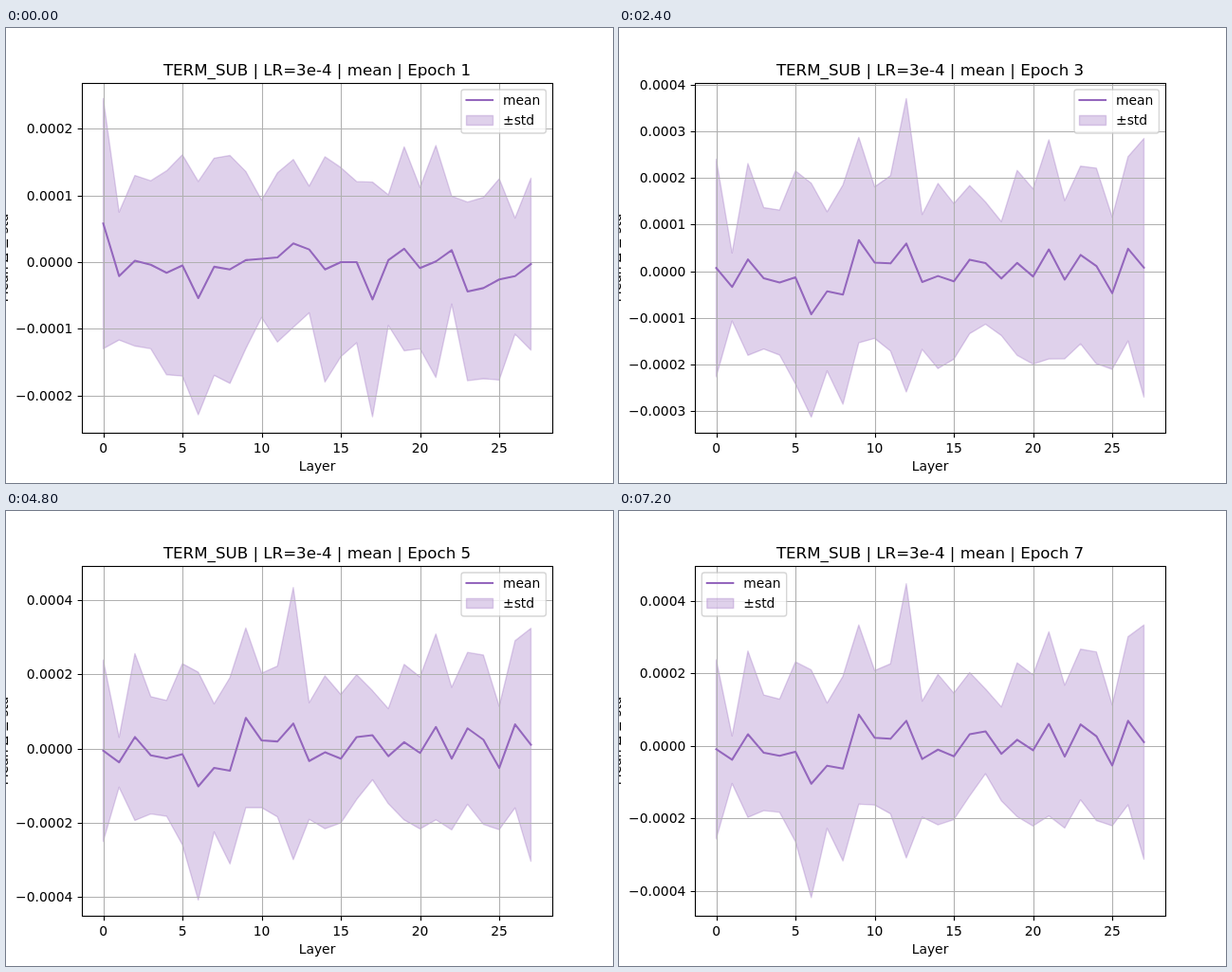
An HTML page for the animation above (8000 ms loop, 640 by 480 pixels).

```html
<!DOCTYPE html>
<html lang="en">
<head>
<meta charset="utf-8">
<title>Mean per layer</title>
<style>
  html, body { margin: 0; width: 100%; height: 100%; overflow: hidden; background: #fff; }
  svg { display: block; width: 640px; height: 480px; }
  text { font: 13.89px "DejaVu Sans", sans-serif; fill: #000; white-space: pre; }
  .title { font-size: 16.67px; }
  .mid { text-anchor: middle; }
  .end { text-anchor: end; }
  .grid { stroke: #b0b0b0; stroke-width: 1.11; fill: none; }
  .axis { stroke: #000; stroke-width: 1.11; fill: none; }
  .band { fill: #9467bd; fill-opacity: .3; stroke: #9467bd; stroke-opacity: .3; stroke-width: 1.39; stroke-linejoin: round; }
  .mean { fill: none; stroke: #9467bd; stroke-width: 2.08; stroke-linejoin: round; stroke-linecap: square; }
  .box { fill: #fff; stroke: #ccc; stroke-width: 1.39; opacity: .8; }
</style>
</head>
<body>
<svg viewBox="0 0 640 480">
  <path id="band" class="band"/>
  <path id="grid" class="grid"/>
  <path id="mean" class="mean"/>
  <path id="ticks" class="axis"/>
  <rect class="axis" x="80.5" y="58.5" width="496" height="369"/>
  <g id="xLabels"></g>
  <g id="yLabels"></g>
  <text class="mid" x="328" y="467">Layer</text>
  <text class="mid" transform="translate(1.5 242.4) rotate(-90)">Mean Δ ± std</text>
  <text id="title" class="title mid" x="328" y="49.5"></text>
  <g id="legend">
    <rect class="box" x="480" y="65" width="89.4" height="46" rx="2.8"/>
    <path class="mean" d="M485.5 76H513"/>
    <rect class="band" x="485.5" y="92.5" width="28" height="10"/>
    <text x="524" y="81">mean</text>
    <text x="524" y="102">±std</text>
  </g>
</svg>
<script>
const HOLD = 1200, LOOP = 8000;
const LEFT = 80, RIGHT = 576, TOP = 58, BOTTOM = 427;
const DATA_TOP = 74.4, DATA_HEIGHT = 336;
const el = id => document.getElementById(id);
const layerX = i => 102.545 + i * 16.7003;
const snap = v => Math.round(v) + 0.5;

// Per-layer profiles in 1e-6: training moves from the first to the settled one.
const first = {
  mean: [58, -21, 2, -4, -16, -5, -54, -7, -11, 3, 5, 7, 28, 19,
    -11, 0, 0, -56, 3, 20, -9, 1, 18, -44, -39, -26, -21, -3],
  std: [188, 96, 128, 126, 153, 166, 175, 163, 171, 133, 88, 127, 126, 95,
    169, 142, 121, 176, 98, 153, 121, 174, 81, 134, 136, 151, 87, 129],
};
const settled = {
  mean: [-10, -38, 33, -19, -27, -16, -105, -55, -63, 88, 23, 20, 70, -37,
    -10, -29, 33, 42, -22, 17, -12, 62, -30, 61, 28, -54, 71, 11],
  std: [248, 65, 231, 160, 156, 249, 316, 173, 256, 249, 187, 208, 382, 161,
    208, 175, 171, 116, 130, 213, 210, 255, 199, 209, 234, 167, 234, 326],
};
// Data range of each epoch in 1e-6.
const highest = [245.5, 285.8, 369.9, 419, 449.5, 450.2, 453.6];
const lowest = [-232.5, -267.7, -312.3, -360.6, -407.6, -432.8, -424.8];

const blend = (key, w) => first[key].map((v, i) => v + (settled[key][i] - v) * w);
const label = (cls, x, y, s) => `<text class="${cls}" x="${x}" y="${y}">${s}</text>`;

let xGrid = "", xTicks = "", xLabels = "";
for (let n = 0; n <= 25; n += 5) {
  const x = snap(layerX(n));
  xGrid += `M${x} ${TOP}V${BOTTOM}`;
  xTicks += `M${x} ${BOTTOM + 0.5}v4.86`;
  xLabels += label("mid", layerX(n), 448, n);
}
el("xLabels").innerHTML = xLabels;

function draw(k) {
  const max = highest[k], min = lowest[k];
  const toY = v => DATA_TOP + (max - v) / (max - min) * DATA_HEIGHT;
  const point = (v, i) => [layerX(i), toY(Math.min(max, Math.max(min, v)))];

  const w = 1 - 0.5 ** k;
  const mean = blend("mean", w), std = blend("std", w);
  const hi = mean.map((m, i) => m + std[i]).map(point);
  const lo = mean.map((m, i) => m - std[i]).map(point);
  el("band").setAttribute("d", `M${hi.concat(lo.reverse()).join("L")}Z`);
  el("mean").setAttribute("d", `M${mean.map(point).join("L")}`);

  const step = max - min > 800 ? 2 : 1;
  let grid = xGrid, ticks = xTicks, labels = "";
  for (let n = -4; n <= 4; n += step) {
    const y = toY(n * 100);
    if (y < TOP || y > BOTTOM) continue;
    grid += `M${LEFT} ${snap(y)}H${RIGHT}`;
    ticks += `M${LEFT + 0.5} ${snap(y)}h-4.86`;
    labels += label("end", 70.3, Math.round(y) + 5, `${n < 0 ? "\u2212" : ""}0.000${Math.abs(n)}`);
  }
  el("grid").setAttribute("d", grid);
  el("ticks").setAttribute("d", ticks);
  el("yLabels").innerHTML = labels;
  el("title").textContent = `TERM_SUB | LR=3e-4 | mean | Epoch ${k + 1}`;
  el("legend").setAttribute("transform", `translate(${k < 6 ? 0 : -392.7} 0)`);
}

let shown = -1;
function tick() {
  const k = Math.floor((performance.now() % LOOP) / HOLD);
  if (k !== shown) draw(shown = k);
  requestAnimationFrame(tick);
}
tick();
</script>
</body>
</html>
```
